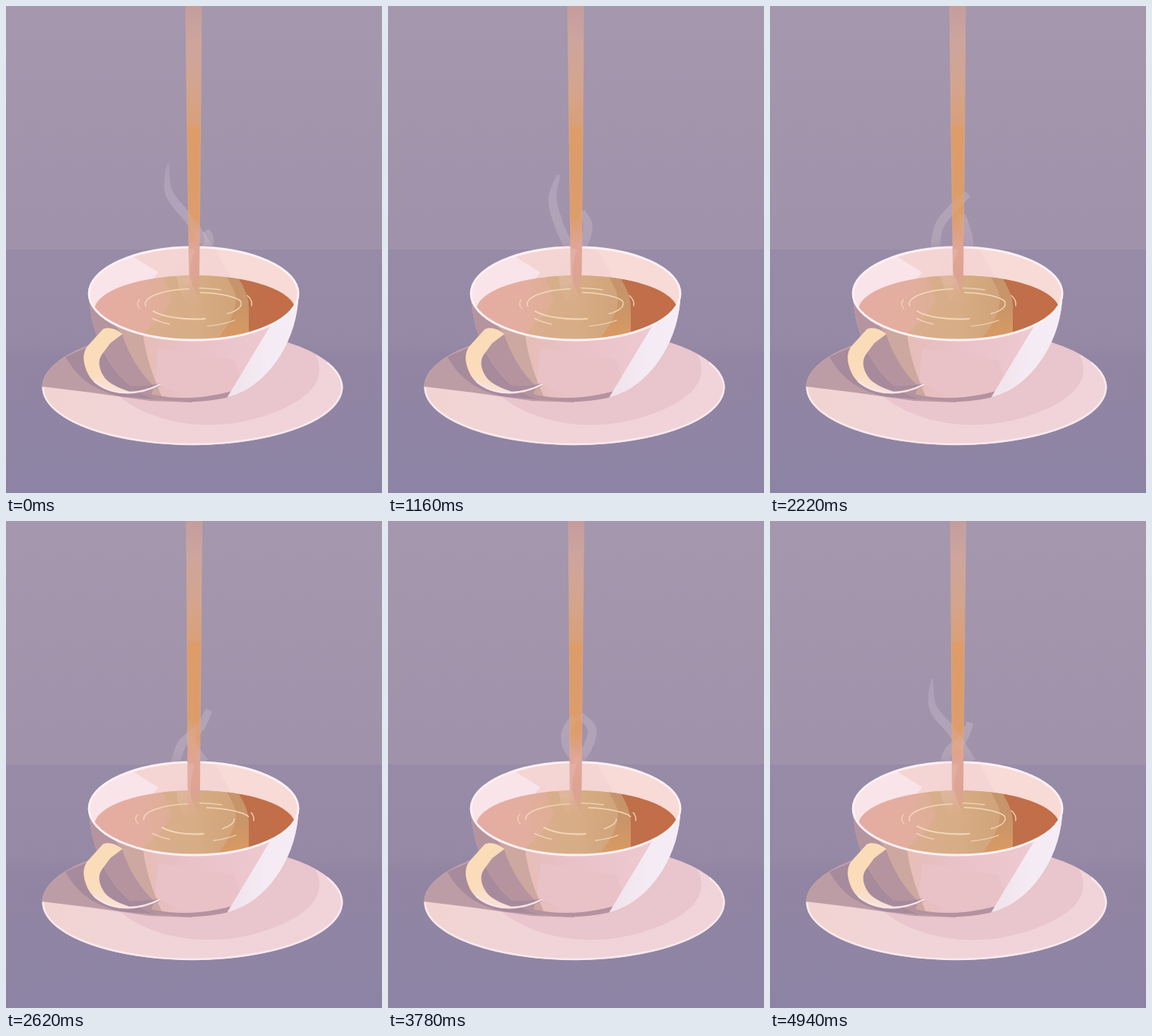
These frames come from a looping animation (494x640 px, 4990 ms). An HTML page with a canvas:

```html
<!DOCTYPE html>
<html lang="en">
<head>
<meta charset="utf-8">
<title>Pouring tea</title>
<style>
html, body { margin: 0; width: 100%; height: 100%; overflow: hidden; background: #9486a3; }
canvas { display: block; width: 494px; height: 640px; }
</style>
</head>
<body>
<canvas id="stage" width="494" height="640"></canvas>
<script>
const ctx = document.getElementById('stage').getContext('2d');
const LOOP = 4990, RIPPLE = LOOP / 9, POUR = 1110;
const TAU = Math.PI * 2;

// Steam poses: four points per ribbon, from the tip down to the rim.
const times = [0, 710, 1560, 2220, 2980, 3780, 4940];
const leftSteam = [
  [213,207, 214,245, 241,281, 266,317],
  [213,207, 214,245, 233,285, 248,319],
  [234,235, 218,262, 219,294, 230,317],
  [260,247, 238,268, 222,290, 217,317],
  [273,250, 268,277, 241,294, 227,319],
  [252,255, 268,273, 262,298, 247,319],
  [263,265, 253,287, 236,301, 229,319]
];
const rightSteam = [
  [262,296, 266,302, 267,310, 265,317],
  [254,265, 262,282, 257,301, 246,319],
  [254,275, 262,288, 264,302, 260,317],
  [252,274, 256,288, 260,303, 262,317],
  [241,258, 231,280, 239,301, 260,317],
  [245,258, 234,277, 236,298, 250,317],
  [213,207, 214,245, 240,278, 265,317]
];

function gradient(x0, y0, x1, y1, ...stops) {
  const g = ctx.createLinearGradient(x0, y0, x1, y1);
  for (const [at, color] of stops) g.addColorStop(at, color);
  return g;
}

function fillPath(d, color) {
  ctx.fillStyle = color;
  ctx.fill(new Path2D(d));
}

function strokePath(d, color, width) {
  ctx.strokeStyle = color;
  ctx.lineWidth = width;
  ctx.stroke(new Path2D(d));
}

function ellipse(x, y, rx, ry) {
  const p = new Path2D();
  p.ellipse(x, y, rx, ry, 0, 0, TAU);
  return p;
}

function clipped(shape, draw) {
  ctx.save();
  ctx.clip(shape);
  draw();
  ctx.restore();
}

const saucer = ellipse(245, 501, 197.5, 76);
const rim = ellipse(246.5, 378, 137.5, 61);
const body = new Path2D('M109 378C111 440 145 498 190 514C222 523 270 522 302 511C350 491 383 436 384.5 378Z');
const tea = new Path2D('M116 450L116 400A132 46 0 0 1 380 400L380 450Z');

function drawBackground() {
  ctx.fillStyle = gradient(0, 0, 0, 320, [0, '#a597ad'], [1, '#a092aa']);
  ctx.fillRect(0, 0, 494, 320);
  ctx.fillStyle = gradient(0, 320, 0, 640,
    [0, '#988ba8'], [0.38, '#9689a6'], [0.44, '#9285a3'], [1, '#8d84a5']);
  ctx.fillRect(0, 320, 494, 320);
}

function drawSaucer() {
  clipped(saucer, () => {
    ctx.fillStyle = gradient(48, 0, 442, 0, [0, '#f1d4d1'], [0.4, '#f0d4d8'], [1, '#f1d3da']);
    ctx.fillRect(40, 420, 410, 160);
    fillPath('M150 514C185 542 250 562 325 543C390 525 428 495 405 455L360 430L240 420Z', '#e9c5cd');
    fillPath('M40 499L112 508L190 519L245 521L245 430L60 430Z', '#bd9da5');
    fillPath('M78 461C92 486 112 504 150 513L230 520L150 430Z', '#a78a9b');
  });
  ctx.strokeStyle = '#f9e9ed';
  ctx.lineWidth = 2.5;
  ctx.beginPath();
  ctx.ellipse(245, 501, 196.3, 74.8, 0, -0.45, Math.PI);
  ctx.stroke();
}

function drawBody() {
  clipped(body, () => {
    ctx.fillStyle = gradient(185, 0, 345, 0, [0, '#e7bdb7'], [0.3, '#e8c1c6'], [1, '#eec9d0']);
    ctx.fillRect(100, 370, 290, 155);
    fillPath('M100 370L180 430Q184 470 210 525L100 525Z', '#cca8a1');
    fillPath('M100 370L152 430C160 455 175 482 195 500L185 525L100 500Z', '#b5949f');
    fillPath('M160 500C210 522 268 518 312 500L305 530L165 530Z', '#b4929f');
    fillPath('M196 492C225 517 275 517 312 500L300 465L200 450Z', '#e9c2c7');
    fillPath('M345 424L289 517L340 530L400 440L390 370Z',
      gradient(300, 0, 385, 0, [0, '#f1e4ec'], [0.5, '#f5ebf4'], [1, '#f6ecf5']));
  });
}

function drawHandle() {
  fillPath('M132 492C148 501 178 501 203 496L203 499C185 508 164 511 145 505Z', '#a78b9c');
  fillPath('M153 431C145 424 133 421 127 425L108 446C101 454 101 464 104 474C108 488 116 497 130 503' +
    'C145 509 158 510 166 508C150 503 137 497 130 489C122 478 120 466 126 458L137 443Z',
    gradient(0, 425, 0, 510, [0, '#fbdcb8'], [0.65, '#fbdcbb'], [1, '#f8e2dc']));
  strokePath('M116 493C138 512 172 513 203 497', '#f9e6e6', 2.5);
}

function drawRipples(t) {
  const phase = (t % RIPPLE) / RIPPLE;
  const wide = phase > 0.45 && phase < 0.87;
  const grow = wide ? 1.035 : 1;
  const turn = wide ? 0.1 : 0;
  const arc = (rx, ry, from, to, width) => {
    ctx.lineWidth = width;
    ctx.beginPath();
    ctx.ellipse(248, 391.5, rx, ry, 0, from, to);
    ctx.stroke();
  };
  ctx.strokeStyle = 'rgba(247,220,190,.9)';
  ctx.lineCap = 'round';
  arc(wide ? 67 : 65, 20, 3.0 + turn, 4.6, 1.4);
  arc(wide ? 52 : 62, 20, 1.35, wide ? 2.55 : 2.65, 1.8);
  arc(wide ? 52 : 61, 18, -0.1 + turn, 0.8, 1.4);
  arc(wide ? 72 : 62, 15, -1.45 + turn, -0.2, 1.5);
  arc(75 * grow, 21, -1.5, -1.1, 1.2);
  arc(75 * grow, 28, -0.4 + turn, 0.08, 1.4);
  arc(75 * grow, 30, 0.8, 1.35 - turn, 1.2);
  arc(72, 30, 2.05, 2.45, 1.3);
  arc(75 * grow, 22, 2.85, 3.4, 1.1);
  ctx.lineCap = 'butt';
}

function drawInside(t) {
  clipped(rim, () => {
    ctx.fillStyle = '#f4d5d4';
    ctx.fillRect(105, 314, 284, 128);
    fillPath('M100 300L160 325L200 350L180 375L100 420Z', '#f9e4ea');
    fillPath('M270 310L300 365L390 410L390 310Z', '#f8dad6');
    clipped(tea, () => {
      ctx.fillStyle = gradient(118, 0, 225, 0, [0, '#e5aca2'], [0.6, '#e3ae9f'], [1, '#dcae92']);
      ctx.fillRect(105, 340, 284, 105);
      fillPath('M205 350L300 352Q322 380 330 440L165 440Q205 415 218 385Z',
        gradient(180, 0, 320, 0, [0, '#dbae90'], [0.5, '#d6ad85'], [1, '#cfa076']));
      fillPath('M285 345L300 375Q310 400 272 445L330 445L330 345Z',
        gradient(0, 360, 0, 435, [0, '#c6946c'], [0.5, '#ca9568'], [1, '#d99a62']));
      fillPath('M296 345Q320 375 319 398L319 445L390 445L390 345Z',
        gradient(300, 0, 380, 0, [0, '#bd704b'], [1, '#c46d47']));
      drawRipples(t);
    });
  });
  ctx.strokeStyle = '#fdf1f4';
  ctx.lineWidth = 2.8;
  ctx.stroke(rim);
}

function drawStream(t) {
  const angle = TAU * (t / POUR - 0.15);
  const half = y => 10.6 - y * 0.0108 + (0.25 + y * 0.0035) * Math.cos(angle - y * 0.002);
  const column = (from, to, inset, color) => {
    const center = y => 246.8 + 0.4 * Math.sin(angle + y * 0.006);
    ctx.beginPath();
    for (let y = from; y <= to; y += 5) ctx.lineTo(center(y) - half(y) + inset, y);
    for (let y = to; y >= from; y -= 5) ctx.lineTo(center(y) + half(y) - inset, y);
    ctx.fillStyle = color;
    ctx.fill();
  };
  column(0, 390, -0.2, gradient(0, 0, 0, 390,
    [0, '#c49d9e'], [0.12, '#cda59d'], [0.27, '#d3a58f'], [0.4, '#d6a283'],
    [0.72, '#dda077'], [0.82, '#e0a596'], [0.91, '#dda392'], [1, 'rgba(214,163,130,0)']));
  column(105, 320, 1.2, gradient(0, 105, 0, 320,
    [0, 'rgba(221,156,104,0)'], [0.24, 'rgba(221,156,104,.35)'], [0.26, '#dd9c68'],
    [0.8, '#dc9d6c'], [1, 'rgba(224,164,148,0)']));
}

function poseAt(poses, t) {
  let i = 0;
  while (i < times.length - 2 && t >= times[i + 1]) i++;
  const u = Math.min(1, (t - times[i]) / (times[i + 1] - times[i]));
  return poses[i].map((v, k) => v + (poses[i + 1][k] - v) * u);
}

// Catmull-Rom through the four pose points.
function curvePoint(pose, u) {
  const s = Math.min(u * 3, 2.9999), i = Math.floor(s), f = s - i;
  const at = (n, axis) => pose[Math.max(0, Math.min(3, n)) * 2 + axis];
  return [0, 1].map(axis => {
    const [a, b, c, d] = [-1, 0, 1, 2].map(n => at(i + n, axis));
    return b + f / 2 * (c - a + f * (2 * a - 5 * b + 4 * c - d + f * (3 * (b - c) + d - a)));
  });
}

function drawRibbon(pose, tip, width, color) {
  const left = [], right = [], steps = 36;
  for (let n = 0; n <= steps; n++) {
    const u = n / steps;
    const [x, y] = curvePoint(pose, u);
    const [x0, y0] = curvePoint(pose, Math.max(0, u - 0.02));
    const [x1, y1] = curvePoint(pose, Math.min(1, u + 0.02));
    const length = Math.hypot(x1 - x0, y1 - y0) || 1;
    const half = (tip + (width - tip) * Math.sin(Math.min(1, u * 1.8) * Math.PI / 2)) / 2;
    const dx = (y1 - y0) / length * half, dy = (x0 - x1) / length * half;
    left.push([x + dx, y + dy]);
    right.unshift([x - dx, y - dy]);
  }
  ctx.beginPath();
  for (const [x, y] of left.concat(right)) ctx.lineTo(x, y);
  ctx.fillStyle = color;
  ctx.fill();
}

function drawSteam(t, strength) {
  const haze = gradient(0, 205, 0, 322,
    [0, 'rgba(205,193,212,.28)'], [0.4, 'rgba(205,193,212,.4)'],
    [0.85, 'rgba(214,196,210,.36)'], [1, 'rgba(225,205,214,.1)']);
  ctx.globalAlpha = strength;
  for (const poses of [rightSteam, leftSteam]) {
    const pose = poseAt(poses, t);
    const tip = Math.max(2, Math.min(9, (pose[1] - 205) / 4));
    drawRibbon(pose, tip, 12, haze);
  }
  ctx.globalAlpha = 1;
}

function drawVapour(t) {
  const sway = 3 * Math.sin(TAU * t / LOOP * 2);
  drawRibbon([238, 318, 233 + sway, 343, 236 - sway, 368, 247, 392], 20, 18,
    gradient(0, 318, 0, 392, [0, 'rgba(240,215,216,.18)'], [0.6, 'rgba(240,205,200,.28)'], [1, 'rgba(230,190,170,0)']));
}

function frame(now) {
  const t = now % LOOP;
  drawBackground();
  drawSaucer();
  drawBody();
  drawInside(t);
  drawHandle();
  drawSteam(t, 0.65);
  drawStream(t);
  drawSteam(t, 0.3);
  drawVapour(t);
  requestAnimationFrame(() => frame(performance.now() - start));
}

const start = performance.now();
frame(0);
</script>
</body>
</html>
```
